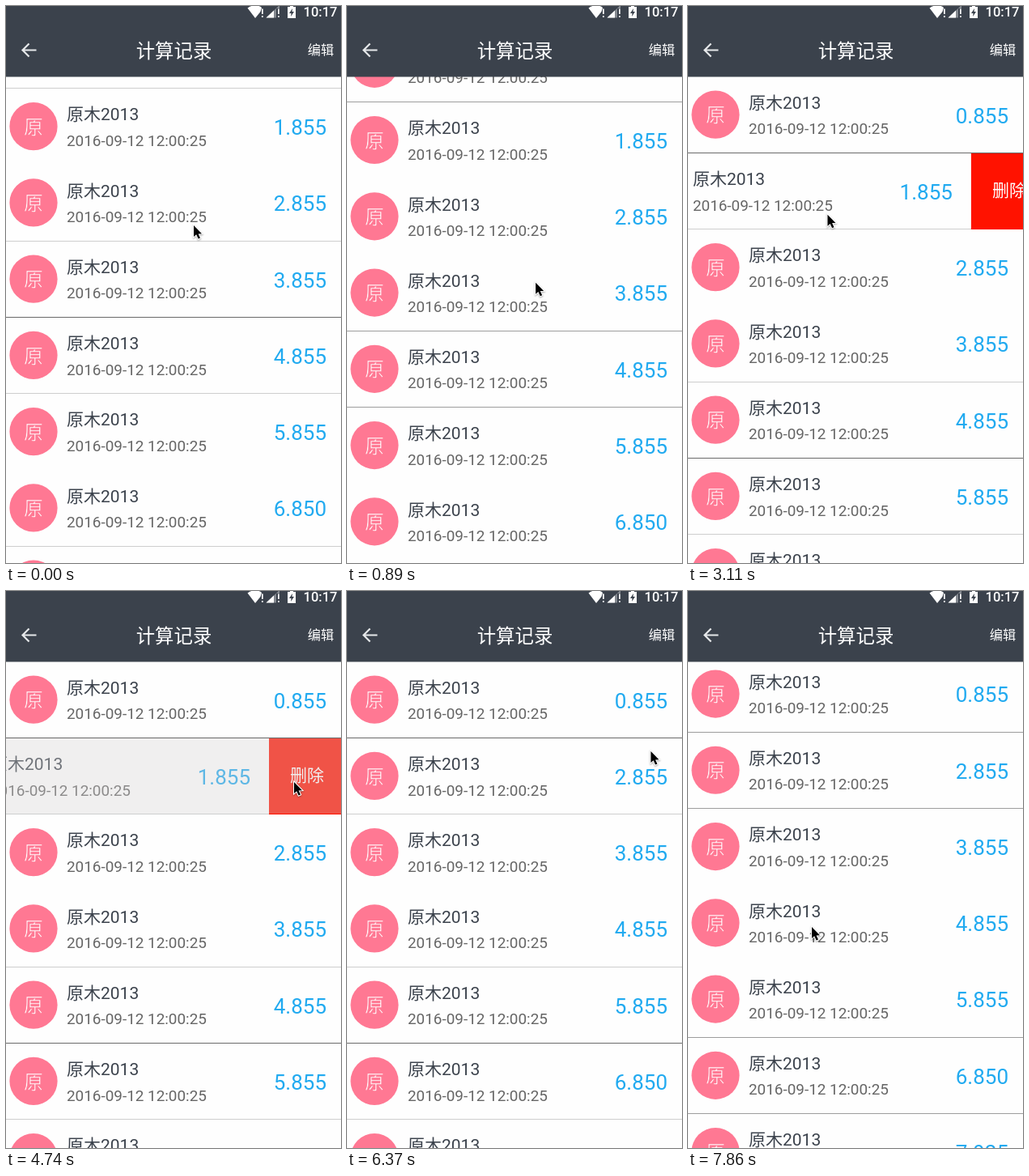
Recreate the animation shown at these times as an HTML page with a canvas. Size 414 px wide and 688 px high, loop 8000 ms.

```html
<!DOCTYPE html>
<html lang="zh-CN">
<head>
<meta charset="utf-8">
<title>计算记录</title>
<style>
html, body { margin: 0; width: 100%; height: 100%; overflow: hidden; background: #fefefe; }
canvas { display: block; width: 414px; height: 688px; }
</style>
</head>
<body>
<canvas id="stage" width="414" height="688"></canvas>
<script>
const ctx = document.getElementById('stage').getContext('2d');
const W = 414, H = 688;
const LOOP = 8000, BEATS = 54, BEAT = 148.15;
const TOP = 86.75, ROW = 94.25, BAR_H = 87.5;
const BAR = '#3b424c', PAPER = '#fefefe', PINK = '#ff7893';
const FONT = 'Roboto, "Noto Sans CJK SC", "Noto Sans CJK", sans-serif';
const VALUES = ['0.855', '1.855', '2.855', '3.855', '4.855', '5.855', '6.850', '7.925', '8.855'];
const REMOVED = 1, FADE_START = 4700, FADE = 120, MOVE = 250;

const clamp = v => Math.max(0, Math.min(1, v));
const linear = p => p;
const smooth = p => 0.5 - Math.cos(Math.PI * p) / 2;
const out = n => p => 1 - (1 - p) ** n;

// A path is a start point and moves: first beat, last beat, end point, easing
const SCROLL = {
  start: [79.75],
  moves: [
    [0, 3, [124], out(2)],
    [4, 6, [62.875], linear],
    [6, 10, [-0.375], out(2)],
    [10, 12, [0], linear],
    [50, 53, [7.125], linear]
  ]
};
const SWIPE = { start: [0], moves: [[18, 23, [94], out(1.45)]] };
const POINTER = {
  start: [232, 271],
  moves: [
    [4, 8, [234, 393], out(1.25)],
    [12, 16, [280, 251], smooth],
    [18, 23, [152, 259], out(2)],
    [25, 29, [356, 236], smooth],
    [34, 38, [379, 161], smooth],
    [42, 43, [375.5, 198], linear],
    [43, 48, [288, 420], out(1.4)],
    [49, 53, [153, 415], out(1.3)]
  ]
};

function follow(path, beat) {
  let pos = path.start;
  for (const [from, to, end, ease] of path.moves) {
    const p = ease(clamp((beat - from) / (to - from)));
    pos = pos.map((v, i) => v + (end[i] - v) * p);
  }
  return pos;
}

function text(str, x, y, size, color, align = 'left', weight = 400) {
  ctx.font = `${weight} ${size}px ${FONT}`;
  ctx.fillStyle = color;
  ctx.textAlign = align;
  ctx.fillText(str, x, y);
}

function poly(points, color) {
  ctx.beginPath();
  points.forEach(([x, y]) => ctx.lineTo(x, y));
  ctx.closePath();
  ctx.fillStyle = color;
  ctx.fill();
}

function rect(x, y, w, h, color) {
  ctx.fillStyle = color;
  ctx.fillRect(x, y, w, h);
}

// Hairline that weakens as it falls between two pixel rows
function divider(y) {
  const py = Math.round(y);
  const a = 0.58 * Math.max(0, 1 - Math.abs(y - py) / 0.37);
  if (a > 0) rect(0, py, W, 1, `rgba(0,0,0,${a})`);
}

function avatar(y) {
  ctx.beginPath();
  ctx.arc(34, y, 29.6, 0, 7);
  ctx.fillStyle = PINK;
  ctx.fill();
  text('原', 34, y + 9.2, 24, '#fff', 'center', 300);
  // A thin outline in the disc colour slims the strokes
  ctx.strokeStyle = PINK;
  ctx.lineWidth = 0.6;
  ctx.strokeText('原', 34, y + 9.2);
}

function row(value, y, shift, fade) {
  const top = Math.round(y) + 1;
  const height = Math.round(y + ROW) + 1 - top;
  rect(0, top, W, height, PAPER);
  ctx.save();
  ctx.translate(-shift, 0);
  avatar(y + 47.4);
  text('原木2013', 75, y + 40.2, 21, '#3b424c');
  text('2016-09-12 12:00:25', 75, y + 71.5, 18.9, '#666');
  text(value, 396, y + 57.8, 26, '#21aaf0', 'right');
  ctx.restore();
  divider(y + ROW);
  if (shift > 0) {
    const left = 419 - shift;
    rect(left, top, 94, height, '#ff1200');
    text('删除', left + 47, y + 54, 21, '#fff', 'center');
  }
  if (fade > 0) rect(0, top, W, height - 1, `rgba(210,208,208,${fade})`);
}

function list(time, beat) {
  const [scroll] = follow(SCROLL, beat);
  const [shift] = follow(SWIPE, beat);
  const fade = clamp((time - FADE_START) / FADE);
  const lift = smooth(clamp((time - FADE_START - FADE) / MOVE));

  rect(0, 0, W, H, PAPER);
  VALUES.forEach((value, i) => {
    const y = TOP + ROW * (i - (i > REMOVED ? lift : 0)) - scroll;
    if (i !== REMOVED) row(value, y, 0, 0);
    else if (lift < 1) row(value, y, shift, fade);
  });
}

function bang(x, y) {
  rect(x, y, 1.7, 6.5, '#fff');
  rect(x, y + 8.5, 1.7, 2, '#fff');
}

function statusIcons() {
  ctx.beginPath();
  ctx.moveTo(308, 15);
  ctx.lineTo(298.5, 2.5);
  ctx.quadraticCurveTo(308, -4, 316, 2);
  ctx.lineTo(314.5, 7);
  ctx.closePath();
  ctx.fillStyle = '#fff';
  ctx.fill();
  bang(316, 3.5);

  poly([[321.5, 14.5], [338, 14.5], [338, -1]], '#858a91');
  poly([[321.5, 14.5], [331, 14.5], [331, 5.5]], '#fff');
  rect(334, 3, 4, 12, BAR);
  bang(336, 3.5);

  rect(348, 1, 10, 14, '#fff');
  rect(351, 0, 4, 1, '#fff');
  poly([[354, 3], [350, 9], [352.5, 9], [352, 13], [356, 7], [353.5, 7]], BAR);
}

function header() {
  rect(0, 0, W, BAR_H, BAR);
  statusIcons();
  text('10:17', 409.5, 13, 16.5, '#fff', 'right', 500);

  ctx.beginPath();
  ctx.moveTo(37.5, 54.5);
  ctx.lineTo(21, 54.5);
  ctx.moveTo(28.5, 46.5);
  ctx.lineTo(20.5, 54.5);
  ctx.lineTo(28.5, 62.5);
  ctx.strokeStyle = '#e6e8ea';
  ctx.lineWidth = 2.2;
  ctx.stroke();

  text('计算记录', 207.5, 63.8, 23.4, '#fff', 'center');
  text('编辑', 389, 60.2, 16.2, '#fff', 'center');
}

function pointer(beat) {
  const [x, y] = follow(POINTER, beat);
  ctx.save();
  ctx.translate(x, y);
  ctx.beginPath();
  [[0, 0], [0, 14], [3.2, 11.2], [5.6, 16.6], [8, 15.6], [5.6, 10.4], [10, 10.2]]
    .forEach(p => ctx.lineTo(...p));
  ctx.closePath();
  ctx.shadowColor = 'rgba(0,0,0,.35)';
  ctx.shadowBlur = 2;
  ctx.shadowOffsetY = 1;
  ctx.strokeStyle = '#fff';
  ctx.lineWidth = 2;
  ctx.stroke();
  ctx.shadowColor = 'transparent';
  ctx.fillStyle = '#000';
  ctx.fill();
  ctx.restore();
}

function draw() {
  const now = performance.now() % LOOP;
  const beat = Math.min(BEATS - 1, Math.floor((now + 5) / BEAT));
  list(beat * BEAT, beat);
  header();
  pointer(beat);
  requestAnimationFrame(draw);
}
draw();
</script>
</body>
</html>
```
